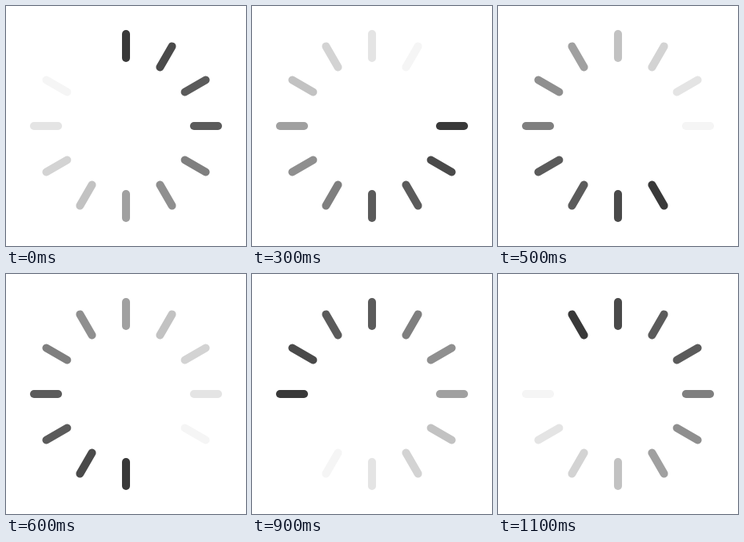
An HTML page with a canvas that plays this animation: 300 by 300 pixels, repeating every 1200 ms.

```html
<!DOCTYPE html>
<html>
<head>
<meta charset="utf-8">
<title>Spinner</title>
<style>
html, body { margin: 0; width: 100%; height: 100%; overflow: hidden; background: #fff; }
canvas { display: block; width: 300px; height: 300px; }
</style>
</head>
<body>
<canvas id="stage" width="300" height="300"></canvas>
<script>
const ctx = document.getElementById('stage').getContext('2d');
const COUNT = 12;
const STEP = 100;
// Grey levels from the leading bar backwards in age; the last bar is hidden.
const GREYS = [0x39, 0x4a, 0x5b, 0x5b, 0x7f, 0x8f, 0xa0, 0xc2, 0xd3, 0xe4, 0xf5];

function drawBar(index, grey) {
  ctx.save();
  ctx.translate(150, 150);
  ctx.rotate(index * 2 * Math.PI / COUNT);
  ctx.strokeStyle = `rgb(${grey}, ${grey}, ${grey})`;
  ctx.lineWidth = 10;
  ctx.lineCap = 'round';
  ctx.beginPath();
  ctx.moveTo(0, -115);
  ctx.lineTo(0, -85);
  ctx.stroke();
  ctx.restore();
}

function draw(time) {
  const lead = Math.floor(time / STEP) % COUNT;
  ctx.fillStyle = '#fff';
  ctx.fillRect(0, 0, 300, 300);
  GREYS.forEach((grey, i) => drawBar(lead + i, grey));
}

const start = performance.now();
function tick() {
  draw(performance.now() - start);
  requestAnimationFrame(tick);
}
tick();
</script>
</body>
</html>
```
